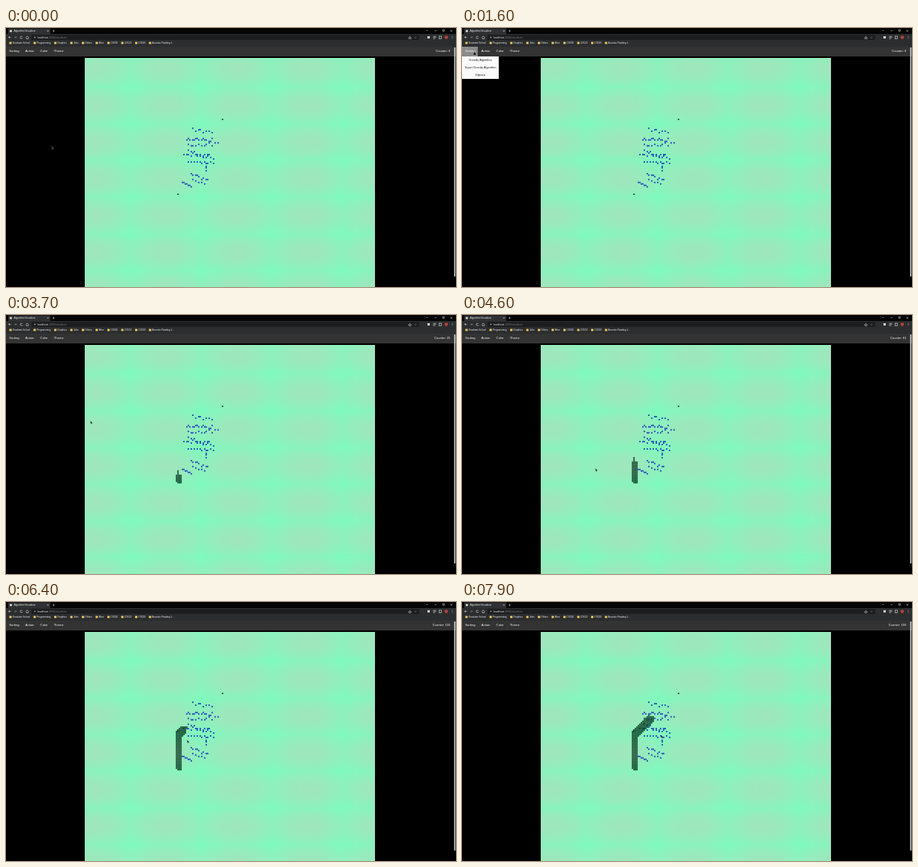
Recreate the animation shown at these times as an HTML page with a canvas. Size 600 by 346 pixels, loop 8000 ms.

```html
<!DOCTYPE html>
<html lang="en">
<head>
<meta charset="utf-8">
<title>Algorithm Visualizer</title>
<style>
html, body { margin: 0; width: 100%; height: 100%; overflow: hidden; background: #000; }
canvas { display: block; }
</style>
</head>
<body>
<canvas id="stage" width="600" height="346"></canvas>
<script>
const W = 600, H = 346, LOOP = 8000, STEP = 100;
const LEFT = 105, TOP = 40, RIGHT = 492;
const PX = 1.979, PY = 1.96;     // cell pitch
const OX = 105.65, OY = 40.78;   // first grid lines
const START = { c: 62, r: 92 };
const g = document.getElementById('stage').getContext('2d');

// Cursor keys: time, x, y
const cursorKeys = [
  [0, 61, 160], [1200, 16, 33], [1700, 16, 33], [2300, 25, 52], [2700, 25, 53],
  [3000, 62, 94], [4600, 178, 207], [5600, 229, 190], [LOOP, 267, 179]
];
function track(keys, t, i) {
  const k = keys.findIndex(key => key[0] > t);
  const a = keys[k - 1], b = keys[k];
  return a[i] + (b[i] - a[i]) * (t - a[0]) / (b[0] - a[0]);
}

let seed = 7;
function random() {
  seed = (seed * 16807) % 2147483647;
  return seed / 2147483647;
}
const column = x => Math.round((x - OX) / PX - 0.5);
const row = y => Math.round((y - OY) / PY - 0.5);

// Walls are loose strokes: from, to, cell count
const strokes = [
  [249, 136, 274, 139, 8], [241, 148, 275, 150, 15], [243, 156, 282, 155, 12],
  [244, 165, 277, 175, 10], [238, 170, 271, 170, 12], [244, 180, 276, 179, 10],
  [267, 181, 266, 191, 4], [247, 194, 269, 203, 9], [250, 203, 264, 208, 5],
  [235, 206, 248, 212, 7]
];
const walls = strokes.flatMap(([x0, y0, x1, y1, n]) =>
  Array.from({ length: n }, (_, i) => {
    const k = i / (n - 1), wobble = n > 7 ? 5 * (random() - 0.5) : 0;
    return [column(x0 + (x1 - x0) * k), row(y0 + (y1 - y0) * k + wobble)];
  }));

// Search order: column and upward row offsets from the start cell
const visited = [[0, 0], [-1, 0], [1, 0], [0, 1], [0, -1], [1, -1], [2, -1], [2, 0], [0, 2]];
for (let r = 1; r <= 24; r++) visited.push([0, r + 2], [1, r], [-1, r], [2, r]);
for (let j = 1; j < 14; j++) {
  for (let k = 4; k >= 0; k--) visited.push([2 + j - k, 24 + j]);
  for (let k = 1; k <= 3; k++) visited.push([2 + j, 24 + j - k]);
}

function rect(x, y, w, h, color) {
  g.fillStyle = color;
  g.fillRect(x, y, w, h);
}
function dot(x, y, r, color) {
  g.fillStyle = color;
  g.beginPath();
  g.arc(x, y, r, 0, 7);
  g.fill();
}
function text(s, x, y, size, color, align = 'left') {
  g.font = size + 'px "Liberation Sans", Arial, sans-serif';
  g.textAlign = align;
  g.fillStyle = color;
  g.fillText(s, x, y);
  return g.measureText(s).width;
}
function lines(color, ...paths) {
  g.strokeStyle = color;
  g.lineWidth = 0.6;
  g.beginPath();
  for (const [x, y, ...rest] of paths) {
    g.moveTo(x, y);
    for (let i = 0; i < rest.length; i += 2) g.lineTo(rest[i], rest[i + 1]);
  }
  g.stroke();
}

// Grid lines narrower than a pixel beat against the raster
function makeGrid() {
  const c = document.createElement('canvas');
  c.width = RIGHT - LEFT;
  c.height = H - TOP;
  const ctx = c.getContext('2d'), img = ctx.createImageData(c.width, c.height);
  const lineAt = (v, origin, pitch) =>
    0.12 + 0.88 * Math.max(0, Math.cos(2 * Math.PI * (v + 0.5 - origin) / pitch));
  const base = [118, 255, 190], line = [200, 205, 185];
  for (let y = 0; y < c.height; y++) for (let x = 0; x < c.width; x++) {
    const lx = lineAt(x + LEFT, OX, PX), ly = lineAt(y + TOP, OY, PY);
    const mix = Math.min(1, 0.32 * lx + 0.42 * ly + 0.25 * lx * ly);
    const p = 4 * (y * c.width + x);
    for (let k = 0; k < 3; k++) img.data[p + k] = base[k] + (line[k] - base[k]) * mix;
    img.data[p + 3] = 255;
  }
  ctx.putImageData(img, 0, 0);
  return c;
}
const grid = makeGrid();

function drawBrowser() {
  rect(0, 0, W, 8, '#050505');
  rect(3, 0.5, 56, 8, '#303134');
  rect(0, 8, W, 17, '#2c2d2f');
  dot(6.5, 4, 1.6, '#ddd');
  text('Algorithm Visualizer', 10.5, 5.3, 3.3, '#f0f0f0');
  lines('#bbb', [54.8, 3, 56.8, 5], [56.8, 3, 54.8, 5], [62, 4, 65, 4], [63.5, 2.5, 63.5, 5.5],
    [560.5, 3, 561.5, 4, 562.5, 3], [571.5, 3.7, 574, 3.7], [592.5, 2.5, 595, 5], [595, 2.5, 592.5, 5]);
  g.strokeRect(582.5, 2.5, 2, 2);

  rect(34, 9.3, 517, 6.6, '#1c1d1f');
  lines('#888', [11, 12.5, 14, 12.5], [12.5, 11, 14, 12.5, 12.5, 14]);
  lines('#ddd', [6.5, 12.5, 3.5, 12.5], [5, 11, 3.5, 12.5, 5, 14],
    [26.5, 12.7, 28.3, 10.8, 30.2, 12.7], [27, 12.5, 27, 14.4, 29.7, 14.4, 29.7, 12.5],
    [537, 12, 537, 14.3, 540, 14.3, 540, 12], [538.5, 13, 538.5, 10.8],
    [569.5, 11.2, 573.5, 11.2], [569.5, 12.7, 573.5, 12.7], [569.5, 14.2, 572, 14.2]);
  g.strokeRect(577.5, 11, 3.2, 3.2);
  g.beginPath();
  g.arc(20.5, 12.6, 1.6, 0.3, 5.7);
  g.stroke();
  dot(38.5, 12.6, 1, '#999');
  const host = text('localhost', 42, 13.9, 3.6, '#eee');
  text(':3000/visualizer', 42 + host, 13.9, 3.6, '#777');
  text('☆', 546, 14.2, 4.5, '#bbb', 'center');
  rect(562, 11, 3, 3, '#e8e8e8');
  dot(587, 12.5, 2.2, '#b5443c');
  for (const y of [11, 12.5, 14]) dot(595, y, 0.45, '#ddd');

  let x = 4.5;
  for (const name of ['Graduate School', 'Programming', 'Graphics', 'Jobs', 'Others', 'Mine',
    'CS536', 'CS522', 'CS539', 'Acoustic Reading L...']) {
    rect(x, 18.6, 3, 2.8, '#f4cf62');
    x += 9 + text(name, x + 4.3, 21.2, 3.1, '#f0f0f0');
  }
}

function drawNav(open, count) {
  rect(0, 25, W, 13, '#333');
  if (open) rect(0, 25, 21, 13, '#8b8b8b');
  let x = 4.3;
  for (const label of ['Sorting', 'Action', 'Color', 'Theme']) {
    x += 8.2 + text(label, x, 32.4, 4.2, '#fff');
  }
  text('Counter: ' + count, 592.3, 32.2, 4.1, '#fff', 'right');
}

function drawMenu(hover) {
  rect(0, 38, 49, 30, '#fafafa');
  if (hover >= 0) rect(0, 38 + hover * 10, 49, 10, '#97979b');
  ['Greedy Algorithm', 'Super Greedy Algorithm', 'Dijkstra']
    .forEach((label, i) => text(label, 24.5, 44.4 + i * 10, 3.9, '#1c1c1c', 'center'));
}

function drawCell(c, r, color) {
  rect(OX + c * PX + 0.12, OY + r * PY + 0.12, PX - 0.24, PY - 0.24, color);
}

function drawBoard(count) {
  g.drawImage(grid, LEFT, TOP);
  for (const [c, r] of walls) drawCell(c, r, '#0830bc');
  for (const [c, r] of visited.slice(0, count + 1)) drawCell(START.c + c, START.r - r, '#003a20');
  drawCell(column(288), row(122), '#00402c');
}

function drawCursor(x, y, hand) {
  g.save();
  g.translate(x, y);
  g.beginPath();
  const shape = hand
    ? [0, -2, 0.8, -2, 0.8, 0, 2.6, 0.4, 2.3, 3, -0.2, 3, -1.5, 1, 0, 1]
    : [0, -2, 0, 1.8, 0.9, 1, 1.5, 2.3, 2.1, 2, 1.5, 0.8, 2.6, 0.8];
  for (let i = 0; i < shape.length; i += 2) g.lineTo(shape[i], shape[i + 1]);
  g.closePath();
  g.fillStyle = '#000';
  g.fill();
  g.strokeStyle = '#aaa';
  g.lineWidth = 0.35;
  g.stroke();
  g.restore();
}

function draw(now) {
  const t = Math.floor(now % LOOP / STEP) * STEP;
  const x = track(cursorKeys, t, 1), y = track(cursorKeys, t, 2);
  const count = t < 2900 ? 0 : Math.max(4, Math.round((t - 3075) / 25));
  const open = t >= 1200 && t < 3300;
  rect(0, 0, W, H, '#000');
  drawBrowser();
  drawNav(open, count);
  drawBoard(count);
  rect(597.6, 26, 1.6, 306, '#d8d8d8');
  if (open) drawMenu(t >= 2700 ? 1 : y < 38 ? -1 : Math.floor((y - 38) / 10));
  drawCursor(x, y, open && t < 2800);
  requestAnimationFrame(draw);
}
requestAnimationFrame(draw);
</script>
</body>
</html>
```
